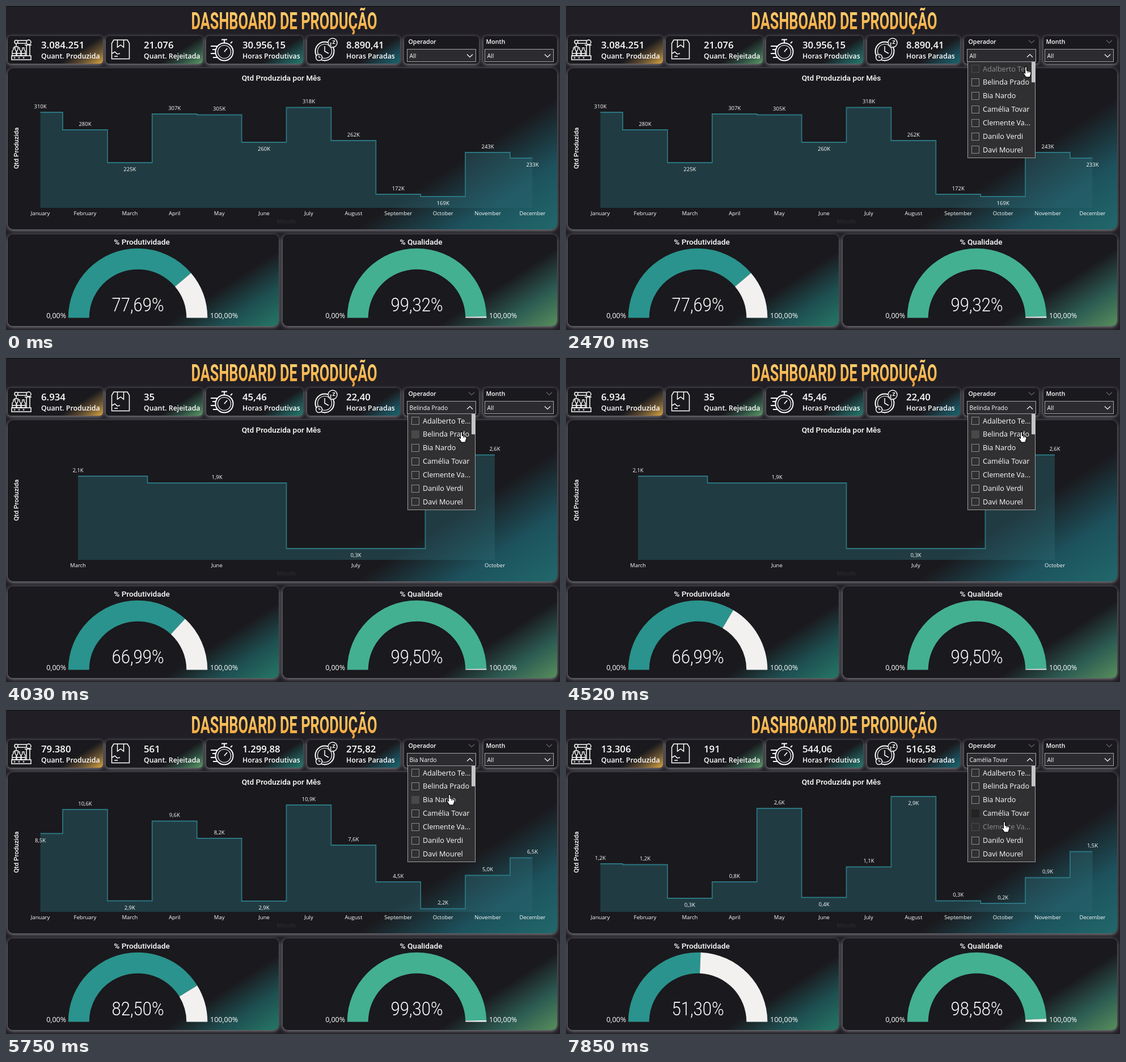
An HTML page with a canvas that plays this animation: 977x573 px, repeating every 8 s.

```html
<!DOCTYPE html>
<html lang="pt">
<head>
<meta charset="utf-8">
<title>Dashboard de Produção</title>
<style>
html, body { margin: 0; width: 100%; height: 100%; overflow: hidden; background: #211f25; }
canvas { display: block; }
</style>
</head>
<body>
<canvas id="stage" width="977" height="573"></canvas>
<script>
const ctx = document.getElementById('stage').getContext('2d');
const LOOP = 8000, BASE = 357;
const SANS = '"Open Sans", "Noto Sans", sans-serif';
const DIN = 'Roboto, "Liberation Sans", sans-serif';
const MONTHS = 'January February March April May June July August September October November December'.split(' ');
const OPERATORS = ['Adalberto Te...', 'Belinda Prado', 'Bia Nardo', 'Camélia Tovar', 'Clemente Va...', 'Danilo Verdi', 'Davi Mourel'];

// points: label:height, with "v" where the label hangs below the line
const STATES = [
  { at: -999, row: -1, name: 'All', cards: ['3.084.251', '21.076', '30.956,15', '8.890,41'], pct: [77.69, 99.32],
    gap: 78.9, skip: [],
    points: '310K:188 280K:219 225K:277v 307K:191 305K:192.5 260K:241v 318K:179.5 262K:238 172K:333 169K:337v 243K:259 233K:269v' },
  { at: 2800, row: 0, name: 'Adalberto Teixeir...', cards: ['8.488', '41', '86,36', '18,12'], pct: [82.66, 99.52],
    gap: 95, skip: [7, 8],
    points: '987:252.5 308:324 258:329v 1538:194 287:326.5v 621:291 1908:155v 604:293v 1349:214 628:290v' },
  { at: 3830, row: 1, name: 'Belinda Prado', cards: ['6.934', '35', '45,46', '22,40'], pct: [66.99, 99.5],
    gap: 245, skip: [0, 1, 3, 4, 7, 8, 10, 11],
    points: '2,1K:209 1,9K:221 0,3K:337v 2,6K:171.5' },
  { at: 5260, row: 2, name: 'Bia Nardo', cards: ['79.380', '561', '1.299,88', '275,82'], pct: [82.5, 99.3],
    gap: 78.9, skip: [],
    points: '8,5K:218.5v 10,6K:176 2,9K:337.5v 9,6K:196.5 8,2K:227 2,9K:338v 10,9K:168 7,6K:239 4,5K:304 2,2K:351.5 5,0K:292.5 6,5K:261.5' },
  { at: 6900, row: 3, name: 'Camélia Tovar', cards: ['13.306', '191', '544,06', '516,58'], pct: [51.3, 98.58],
    gap: 78.9, skip: [],
    points: '1,2K:272 1,2K:273.5 0,3K:333v 0,8K:304 2,6K:174 0,4K:331.5v 1,1K:277.5 2,9K:153v 0,3K:337.5 0,2K:342 0,9K:296.5 1,5K:250.5' }
];

// pointer tip: time, x, y
const PATH = [[1120, 169, 2], [1580, 838, 70], [1790, 824, 83], [2130, 824, 83], [2480, 811, 108], [3300, 811, 108],
  [3630, 803, 131], [4600, 803, 131], [5060, 782, 150], [6040, 782, 150], [6600, 777, 175], [7000, 777, 175],
  [7650, 775, 193], [7770, 775, 193], [7780, 773, 198]];

const ease = p => p < .5 ? 4 * p ** 3 : 1 - 4 * (1 - p) ** 3;
const clamp = p => Math.min(1, Math.max(0, p));
const stateAt = t => STATES.findLastIndex(s => t >= s.at);

// y is the middle of the capitals
function text(str, x, y, size, { font = SANS, weight = 400, align = 'left', color = '#fff' } = {}) {
  ctx.font = `${weight} ${size}px ${font}`;
  ctx.textAlign = align;
  ctx.fillStyle = color;
  ctx.fillText(str, x, y + size * .36);
}

function condensed(str, x, y, size, ratio, weight, color) {
  ctx.save();
  ctx.translate(x, y);
  ctx.scale(ratio, 1);
  text(str, 0, 0, size, { font: DIN, weight, align: 'center', color });
  ctx.restore();
}

function stroke(d, color = '#fff', width = 1.5) {
  ctx.strokeStyle = color;
  ctx.lineWidth = width;
  ctx.stroke(new Path2D(d));
}

function ring(x, y, r, width = 1.5, fill) {
  ctx.beginPath();
  ctx.arc(x, y, r, 0, 7);
  if (fill) { ctx.fillStyle = fill; ctx.fill(); }
  ctx.strokeStyle = '#fff';
  ctx.lineWidth = width;
  ctx.stroke();
}

function box(x, y, w, h, fill, line) {
  ctx.fillStyle = fill;
  ctx.fillRect(x, y, w, h);
  if (!line) return;
  ctx.strokeStyle = line;
  ctx.lineWidth = 1;
  ctx.strokeRect(x + .5, y + .5, w - 1, h - 1);
}

// dark rounded panel, coloured from its lower right corner
function panel(x, y, w, h, r, reach, ...colors) {
  ctx.save();
  ctx.beginPath();
  ctx.roundRect(x, y, w, h, r);
  ctx.shadowColor = '#8c8c92';
  ctx.shadowBlur = 6;
  ctx.shadowOffsetX = -.5;
  ctx.shadowOffsetY = 1.5;
  ctx.fillStyle = '#1a191d';
  ctx.fill();
  ctx.shadowColor = 'transparent';
  if (reach) {
    const g = ctx.createLinearGradient(x + w, y + h, x + w - .55 * reach, y + h - .84 * reach);
    [...colors, '#1a191d'].forEach((c, i, all) => g.addColorStop(i / (all.length - 1), c));
    ctx.fillStyle = g;
    ctx.fill();
  }
  ctx.restore();
}

const chevron = (x, y, dir, color = '#fff', s = 5) =>
  stroke(`M${x - s} ${y - dir * s / 2}L${x} ${y + dir * s / 2}L${x + s} ${y - dir * s / 2}`, color, 1.2);

function icons() {
  // robot arm over bottles on a belt
  stroke('M10 88H44V95H10ZM36 88V69M42 88V69M33 69H45M21 61H37M21 66H37M18 67V71M14 72H22');
  ring(18, 63.5, 3);
  ring(40, 64, 4);
  for (const x of [11, 19, 27]) {
    stroke(`M${x} 88V80l2-3V74h3v3l2 3V88ZM${x} 84h7`, '#fff', 1.3);
    ring(x + 4, 91.5, 1, 1);
  }
  // parcel
  stroke('M186.500 66L190 60H214L217.500 66V93.500H186.500ZM196.500 60V73L202 69L207.500 73V60M187 84L192 81L196 85L201 84M191 89H197');
  // stopwatch
  ring(385, 81, 15.5, 2);
  ring(385, 81, 11.5, 1.2);
  stroke('M380 59.500H390M385 60V65M396 66L399 63M385 81L390 75M361 71H372M364 77H370M361 84H369M365 91H373', '#fff', 1.8);
  // sleeping clock
  ring(562, 80, 16.5, 2);
  ring(562, 80, 12.5, 1.2);
  stroke('M562 71V80L569 84');
  ring(576, 65, 8, 1.4, '#1a191d');
  text('z', 570.5, 67, 8, { weight: 700 });
  text('Z', 575.5, 64, 9, { weight: 700 });
  ring(552, 91, 5.5, 1.4, '#1a191d');
  stroke('M552 87.500V91H555', '#fff', 1.2);
}

function cards(values) {
  const list = [
    [3, 168, 62, 'Quant. Produzida', '#dca63f', '#6a5433'],
    [176, 171, 243, 'Quant. Rejeitada', '#5c9c62', '#315545'],
    [353, 171, 417, 'Horas Produtivas', '#247a6b', '#1f4f4f'],
    [531, 164, 600, 'Horas Paradas', '#1c666e', '#1c444f']
  ];
  list.forEach(([x, w, tx, label, ...colors], i) => {
    panel(x, 53, w, 49, 6, 42, ...colors);
    text(values[i], tx, 69, 16.8, { weight: 600 });
    text(label, tx, 89, 12.3, { weight: 600 });
  });
  icons();
}

function chart({ points, gap, skip }) {
  panel(3, 110, 969, 285, 10, 195, '#20686a', '#1d525d');
  text('Qtd Produzida por Mês', 485.5, 127, 13.6, { font: DIN, weight: 500, align: 'center' });
  text('Month', 494.5, 381, 11.5, { font: DIN, weight: 500, align: 'center', color: '#29282d' });
  ctx.save();
  ctx.translate(18, 251.5);
  ctx.rotate(-Math.PI / 2);
  text('Qtd Produzida', 0, 0, 11.5, { font: DIN, weight: 500, align: 'center' });
  ctx.restore();

  const names = MONTHS.filter((m, i) => !skip.includes(i));
  const last = names.length - 1, left = 494.5 - last * gap / 2, right = left + last * gap;
  const items = points.split(' ').map((p, i) => {
    const [label, y] = p.split(':');
    return { label, x: left + i * gap, y: parseFloat(y), below: y.endsWith('v') };
  });
  const line = items.map(({ x, y }, i) =>
    `${i ? 'L' : 'M'}${Math.max(left, x - gap / 2)} ${y}H${Math.min(right, x + gap / 2)}`).join('');
  ctx.fillStyle = 'rgba(43,100,112,.45)';
  ctx.fill(new Path2D(`${line}V${BASE}H${left}Z`));
  stroke(line, '#2b7681', 1.8);
  const style = { align: 'center', weight: 500 };
  items.forEach(({ label, x, y, below }, i) => {
    text(label, x, y + (below ? 12 : -10.5), 9.5, style);
    text(names[i], x, 366.5, 9.5, style);
  });
}

function gauge(x, title, titleX, color, value, shown) {
  const y = 551.5, split = Math.PI * (1 + shown / 100);
  const arc = (from, to, fill) => {
    ctx.beginPath();
    ctx.arc(x, y, 122.8, from, to);
    ctx.arc(x, y, 85.8, to, from, true);
    ctx.fillStyle = fill;
    ctx.fill();
  };
  arc(Math.PI, split, color);
  arc(split, 2 * Math.PI, '#f2f1f0');
  text(title, titleX, 417, 13.7, { font: DIN, weight: 500, align: 'center' });
  condensed(value.toFixed(2).replace('.', ',') + '%', x, 528, 34, .86, 300, '#fff');
  text('0,00%', x - 126.5, 547, 12.5, { align: 'right' });
  text('100,00%', x + 127.5, 547, 12.5);
}

function gauges(now, before, p) {
  const shown = i => before.pct[i] + (now.pct[i] - before.pct[i]) * p;
  panel(3, 404, 478, 162, 9, 112, '#267766', '#1e5052');
  panel(488, 404, 484, 162, 9, 116, '#578f5b', '#2c5b52');
  gauge(232.5, '% Produtividade', 239.5, '#2a938d', now.pct[0], shown(0));
  gauge(724.5, '% Qualidade', 732, '#43b091', now.pct[1], shown(1));
}

function slicer(x, w, label, value, open) {
  text(label, x + 2.5, 63, 10.6, { weight: 600 });
  box(x, 76, w, 23, '#2c2b2f', '#a8a8a8');
  text(value, x + 4.5, 88.5, 10.4);
  chevron(x + w - 11, 88, open ? -1 : 1);
}

function hoverHeader() {
  ctx.strokeStyle = '#8c8c8c';
  ctx.lineWidth = 1.5;
  ctx.strokeRect(700, 52.5, 136, 54);
  for (const x of [757, 784, 811]) box(x, 28, 23, 23, '#f4f4f4');
  stroke('M761.500 34H775.500L770 40.500V47L767 45V40.500Z', '#666', 1.2);
  stroke('M789 34H802V45H789ZM789 40H795V45M797 39L800 36M797 36H800V39', '#666', 1.2);
  ctx.fillStyle = '#444';
  for (const x of [817, 822, 827]) ctx.fillRect(x, 39, 2, 2);
  stroke('M797 65L804 58L809 62L802 69H800ZM800 62L805 66', '#77767b', 1.1);
}

function dropdown(filled, selected, settled, hovered) {
  box(708, 98, 120, 171, '#302f31', '#a0a0a0');
  if (!filled) return;
  OPERATORS.forEach((name, i) => {
    const y = 111 + i * 23.9, top = Math.round(y - 7), hover = i === hovered;
    const dim = hover && i !== settled;
    if (i === selected) box(715, top, 14, 14, hover ? '#484848' : '#232324');
    else box(715, top, 14, 14, '#302f31', dim ? '#4c4c4c' : '#8c8c8c');
    text(name, 735, y, 12.6, { color: dim ? '#8d8d8d' : '#fff' });
  });
  box(821, 99, 7, 36, '#c4c4c4');
}

function pointer(x, y, hand) {
  const shape = new Path2D(hand
    ? 'M-1.500 0Q0-1.500 1.500 0V6L8 8Q9.500 9 9 12L7 18H0L-4 12Q-5.500 9-3.500 9L-1.500 11Z'
    : 'M0 0V14L3.200 11.200L5.500 16L7.700 15L5.500 10.300H10Z');
  ctx.save();
  ctx.translate(x, y);
  ctx.lineWidth = 1.2;
  ctx.strokeStyle = '#000';
  ctx.fillStyle = '#fff';
  ctx.fill(shape);
  ctx.stroke(shape);
  if (hand) stroke('M3.500 7V10.500M6 8V10.500', '#000', .8);
  ctx.restore();
}

function pointerAt(t) {
  const i = PATH.findLastIndex(k => t >= k[0]);
  const [t0, x0, y0] = PATH[i], [t1, x1, y1] = PATH[i + 1] || [LOOP, x0, y0];
  const p = (t - t0) / (t1 - t0), e = p * p * (3 - 2 * p);
  return [x0 + (x1 - x0) * e, y0 + (y1 - y0) * e];
}

function draw(t) {
  const index = stateAt(t), state = STATES[index];
  const picked = STATES[stateAt(t + 210)], settled = STATES[stateAt(t - 70)];
  const open = t >= 1860, inList = t >= 2130;
  const [px, py] = t >= PATH[0][0] ? pointerAt(t) : [-50, -50];

  ctx.fillStyle = '#211f25';
  ctx.fillRect(0, 0, 977, 573);
  box(0, 0, 977, 1, '#0c0c0e');
  const gold = ctx.createLinearGradient(0, -16, 0, 16);
  gold.addColorStop(0, '#ffcd6c');
  gold.addColorStop(1, '#f2a93f');
  condensed('DASHBOARD DE PRODUÇÃO', 490.5, 26, 42, .605, 700, gold);

  cards(settled.cards);
  panel(702, 53, 132, 49, 6);
  panel(842, 53, 130, 49, 6);
  chart(state);
  gauges(state, STATES[Math.max(0, index - 1)], ease(clamp((t - state.at - 70) / 250)));

  const hovering = t >= 1540 && !inList;
  if (hovering) hoverHeader();
  slicer(707, 122, 'Operador', picked.name, open);
  slicer(844, 122, 'Month', 'All', false);
  if (hovering || inList) chevron(821, 63, 1, '#66656a');
  if (inList) chevron(958, 63, 1, '#66656a');
  if (open) dropdown(t >= 1930, picked.row, settled.row, Math.floor((py - 99) / 24));
  pointer(px, py, inList && py > 99);
}

function frame(now) {
  draw(now % LOOP);
  requestAnimationFrame(frame);
}
requestAnimationFrame(frame);
</script>
</body>
</html>
```
